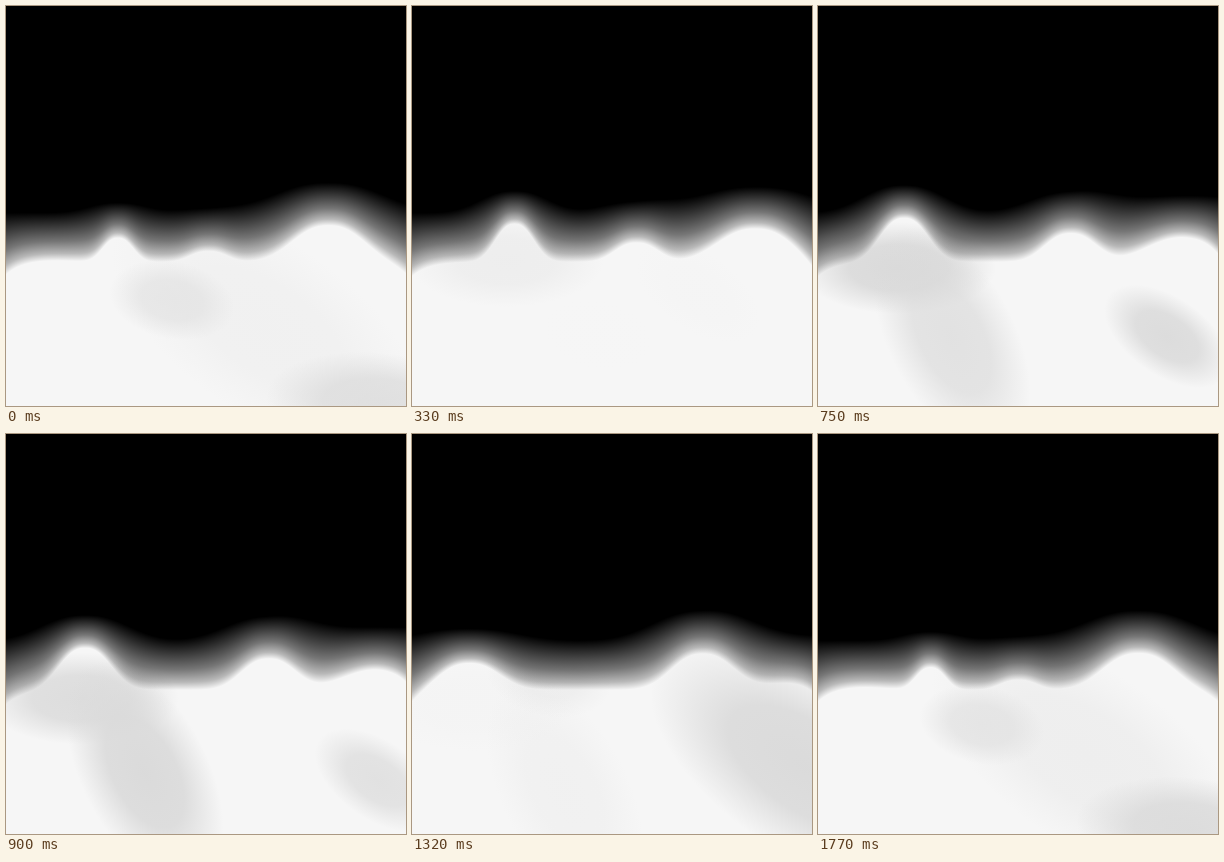
These frames come from a looping animation (400 by 400 pixels, 1800 ms). An HTML page with a canvas:

```html
<!DOCTYPE html>
<html lang="en">
<head>
<meta charset="utf-8">
<title>Drifting fog</title>
<style>
html, body { margin: 0; width: 100%; height: 100%; overflow: hidden; background: #000; }
canvas { display: block; width: 100vw; height: 100vh; }
</style>
</head>
<body>
<canvas id="stage" width="400" height="400"></canvas>
<script>
const ctx = document.getElementById("stage").getContext("2d");
const LOOP = 1800, STEP = 30, SIZE = 400;
const HAZE_Y = 207, CLOUD_Y = 256, BIRTH = .733;

// Puffs rise near the middle and drift outwards; ages are counted in loops
const puffs = [
  { life: 1.3, lift: 44, haze: 28, x: age => 118 - 62 * age ** 1.7, width: age => 12 + 28 * age },
  { life: 2.3, lift: 37, haze: 31, x: age => 170 + 120 * age, width: age => 18 + 22 * age }
];

// Soft grey patches: peak and span in loops, speed in pixels per loop
const patches = [
  { peak: .42, span: .75, x: 80, y: 262, vx: -60, vy: 30, rx: 85, ry: 40, turn: 0, grey: 218 },
  { peak: .52, span: .6, x: 140, y: 340, vx: 60, vy: 80, rx: 105, ry: 55, turn: 1.1, grey: 218 },
  { peak: .42, span: .55, x: 350, y: 331, vx: 270, vy: 190, rx: 62, ry: 34, turn: .6, grey: 220 },
  { peak: .8, span: .55, x: 360, y: 330, vx: -500, vy: -40, rx: 155, ry: 75, turn: .6, grey: 214 },
  { peak: .9, span: .6, x: 155, y: 275, vx: 110, vy: 190, rx: 55, ry: 34, turn: .2, grey: 226 },
  { peak: .93, span: .4, x: 367, y: 384, vx: 110, vy: 210, rx: 100, ry: 45, turn: .1, grey: 216 }
];

function drawPatch(p, phase) {
  const d = (phase - p.peak + 1.5) % 1 - .5;
  if (Math.abs(d) >= p.span / 2) return;
  const fade = ctx.createRadialGradient(0, 0, 0, 0, 0, 1);
  [[0, 1], [.5, .9], [.8, .35], [1, 0]].forEach(([stop, alpha]) =>
    fade.addColorStop(stop, `rgba(${p.grey},${p.grey},${p.grey},${alpha})`));
  ctx.save();
  ctx.globalAlpha = Math.cos(Math.PI * d / p.span) ** 2;
  ctx.translate(p.x + p.vx * d, p.y + p.vy * d);
  ctx.rotate(p.turn);
  ctx.scale(p.rx * 1.15, p.ry * 1.15);
  ctx.fillStyle = fade;
  ctx.fillRect(-1, -1, 2, 2);
  ctx.restore();
}

// Every puff that is alive now, including those born in earlier loops
function livePuffs(phase) {
  const live = [];
  for (const p of puffs) {
    for (let age = (phase - BIRTH + 1) % 1; age < p.life; age++) {
      const swell = Math.sin(Math.PI * age / p.life);
      live.push({
        x: p.x(age), width: p.width(age),
        lift: p.lift * swell ** 1.2, haze: p.haze * swell ** 2
      });
    }
  }
  return live;
}

const bump = (d, width) => Math.exp(-(Math.abs(d / width) ** 2.4));

function drawSky(live) {
  for (let x = 0; x < SIZE; x++) {
    let top = HAZE_Y;
    let bottom = CLOUD_Y + 14 * Math.abs(x / 200 - 1) ** 12;
    for (const p of live) {
      top -= p.haze * bump(x - p.x, p.width * 1.3 + 12);
      bottom -= p.lift * bump(x - p.x, p.width);
    }
    const dark = ctx.createLinearGradient(0, top, 0, bottom);
    [[0, 1], [.3, .76], [.6, .52], [.85, .25], [1, 0]].forEach(([stop, alpha]) =>
      dark.addColorStop(stop, `rgba(0,0,0,${alpha})`));
    ctx.fillStyle = dark;
    ctx.fillRect(x, 0, 1, bottom + 1);
  }
}

function draw(phase) {
  ctx.fillStyle = "#f6f6f6";
  ctx.fillRect(0, 0, SIZE, SIZE);
  patches.forEach(p => drawPatch(p, phase));
  drawSky(livePuffs(phase));
}

function tick() {
  draw(Math.floor(performance.now() % LOOP / STEP) * STEP / LOOP);
  requestAnimationFrame(tick);
}
tick();
</script>
</body>
</html>
```
